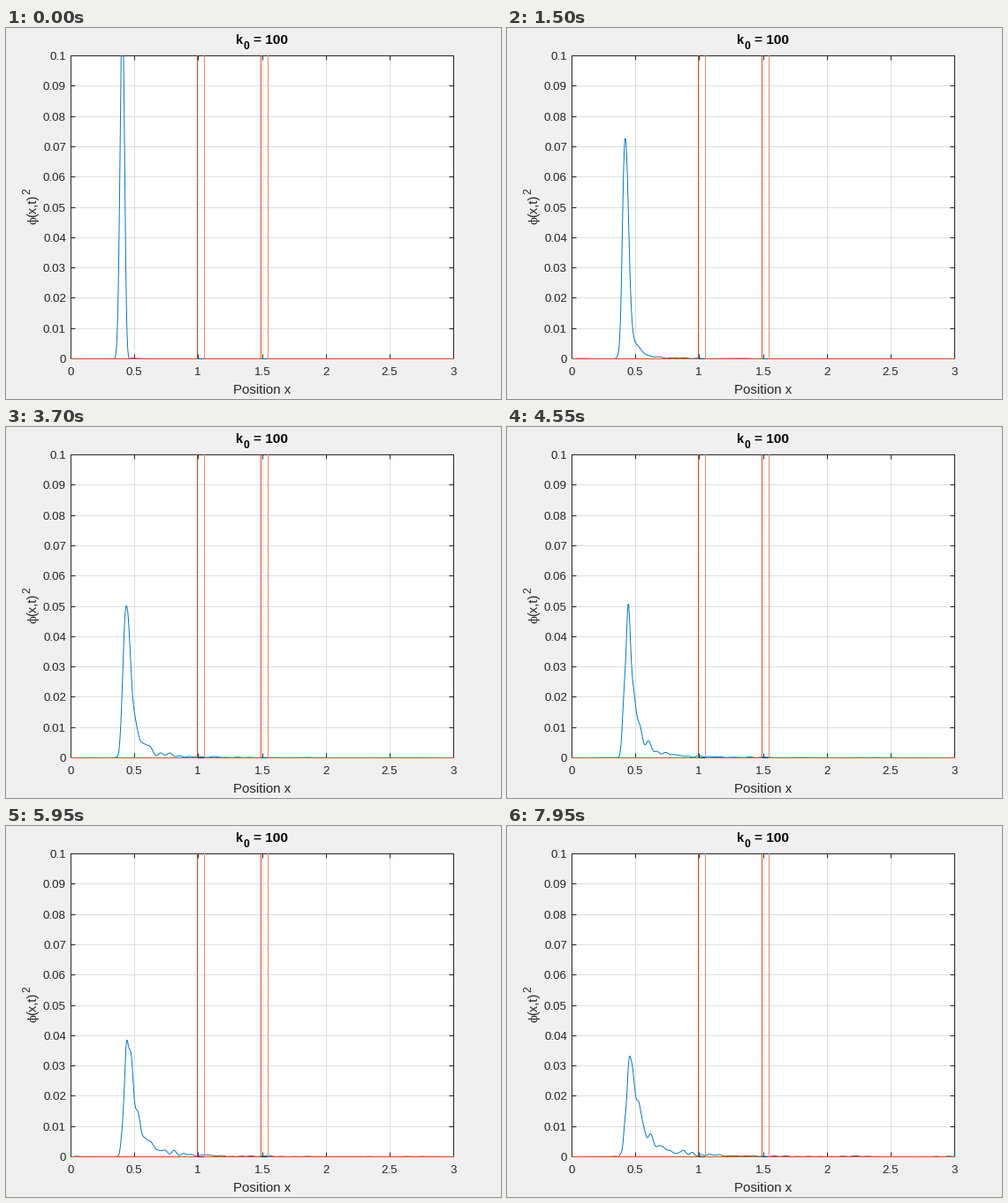
Write a matplotlib script that moves like this. It is 560 px wide and 420 px high and loops after 8000 ms.

```python
import numpy as np
import matplotlib.pyplot as plt
from matplotlib.animation import FuncAnimation
from matplotlib.patches import Rectangle

W, H, DPI = 560, 420, 100
FRAMES, INTERVAL = 160, 50
LEFT, RIGHT, TOP, BOTTOM = 73.5, 506.5, 31.5, 374.5
X_MAX, Y_MAX = 3.0, 0.1
DARK, GRID, BLUE, ORANGE = "#262626", "#DFDFDF", "#0072BD", "#D95319"
PALE_ORANGE = "#E58E69"
BARRIERS = ((1.0, 1.05), (1.5, 1.55))
TICK = 4.5


def pt(px):
    return px * 72 / DPI


def to_x(x):
    return LEFT + np.asarray(x) / X_MAX * (RIGHT - LEFT)


def to_y(v):
    return BOTTOM - np.asarray(v) / Y_MAX * (BOTTOM - TOP)


def center(p):
    return np.floor(p) + 0.5


# Wave packet: Crank-Nicolson steps, applied in the energy basis
DX, DT = 0.005, 0.025
X0, K0, SIGMA2, V0 = 0.4, 100, 1e-3, 300
x = np.linspace(0, X_MAX, round(X_MAX / DX) + 1)
V = np.zeros_like(x)
for lo, hi in BARRIERS:
    V[(x > lo - 0.007) & (x < hi - 0.002)] = V0
off = np.full(len(x) - 1, -0.5 / DX**2)
energy, modes = np.linalg.eigh(np.diag(1 / DX**2 + V) + np.diag(off, 1) + np.diag(off, -1))
start = np.exp(-(x - X0) ** 2 / SIGMA2 + 1j * K0 * x)
start /= np.sqrt(np.sum(np.abs(start) ** 2))
weights = modes.T @ start
angle = 2 * np.arctan(energy * DT / 2)


def density(step):
    return np.abs(modes @ (weights * np.exp(-1j * angle * step))) ** 2


fig = plt.figure(figsize=(W / DPI, H / DPI), dpi=DPI, facecolor="#F0F0F0")
ax = fig.add_axes([0, 0, 1, 1])
ax.set_xlim(0, W)
ax.set_ylim(H, 0)
ax.axis("off")


def line(xs, ys, color, width=1.0, z=2):
    return ax.plot(xs, ys, color=color, lw=pt(width), zorder=z, snap=False,
                   solid_capstyle="projecting", solid_joinstyle="miter")[0]


def label(px, py, s, size, color=DARK, ha="center", font="Liberation Sans", **kw):
    ax.text(px, py, s, fontsize=pt(size), color=color, ha=ha, va="baseline",
            family=font, **kw)


# Axes, grid and ticks
ax.add_patch(Rectangle((LEFT, TOP), RIGHT - LEFT, BOTTOM - TOP, fc="white", ec="none", zorder=0))
for i in range(7):
    px = center(to_x(i * 0.5))
    if 0 < i < 6:
        line([px, px], [TOP, BOTTOM], GRID, z=1)
    line([px, px], [BOTTOM, BOTTOM - TICK], DARK)
    line([px, px], [TOP, TOP + TICK], DARK)
    label(px - 0.5, 393, f"{i * 0.5:g}", 13.33)
for i in range(11):
    py = center(to_y(i * 0.01))
    if 0 < i < 10:
        line([LEFT, RIGHT], [py, py], GRID, z=1)
    line([LEFT, LEFT + TICK], [py, py], DARK)
    line([RIGHT, RIGHT - TICK], [py, py], DARK)
    label(68, py + 4.8, f"{i * 0.01:g}", 13.33, ha="right")
line([LEFT, RIGHT, RIGHT, LEFT, LEFT], [TOP, TOP, BOTTOM, BOTTOM, TOP], DARK, z=3)

# Title and axis labels
label(260, 18, "k", 14.67, "black", "left", weight="bold")
label(268.5, 24.5, "0", 12, "black", "left", weight="bold")
label(319, 18, "= 100", 15.4, "black", "right", weight="bold")
label(289.7, 414, "Position x", 15)
for px, py, s, size, font in ((34, 222.5, "\u03d5", 13, "DejaVu Serif"),
                              (34, 213.5, "(x,t)", 14.67, "Liberation Sans"),
                              (27, 188, "2", 12, "Liberation Sans")):
    label(px, py, s, size, ha="left", font=font, rotation=90, rotation_mode="anchor")

wave = line([], [], BLUE, 0.95, z=4)
wave.set_clip_path(Rectangle((LEFT - 0.5, TOP - 0.5), RIGHT - LEFT + 1, BOTTOM - TOP + 1,
                             transform=ax.transData))

# Potential: floor segments and barrier walls
edge = 0.0
for lo, hi in BARRIERS:
    rise, fall = center(to_x(lo - 0.01)), center(to_x(hi) - 0.5)
    line([to_x(edge), rise], [BOTTOM, BOTTOM], ORANGE, z=5)
    line([rise, rise], [TOP, BOTTOM], ORANGE, z=5)
    line([fall, fall], [TOP, BOTTOM], PALE_ORANGE, z=5)
    edge = hi
line([to_x(edge), RIGHT], [BOTTOM, BOTTOM], ORANGE, z=5)


def update(i):
    wave.set_data(to_x(x), to_y(density(i + 1)))
    return (wave,)


anim = FuncAnimation(fig, update, frames=FRAMES, interval=INTERVAL, repeat=True,
                     repeat_delay=0, init_func=lambda: update(0))
plt.show()
```
